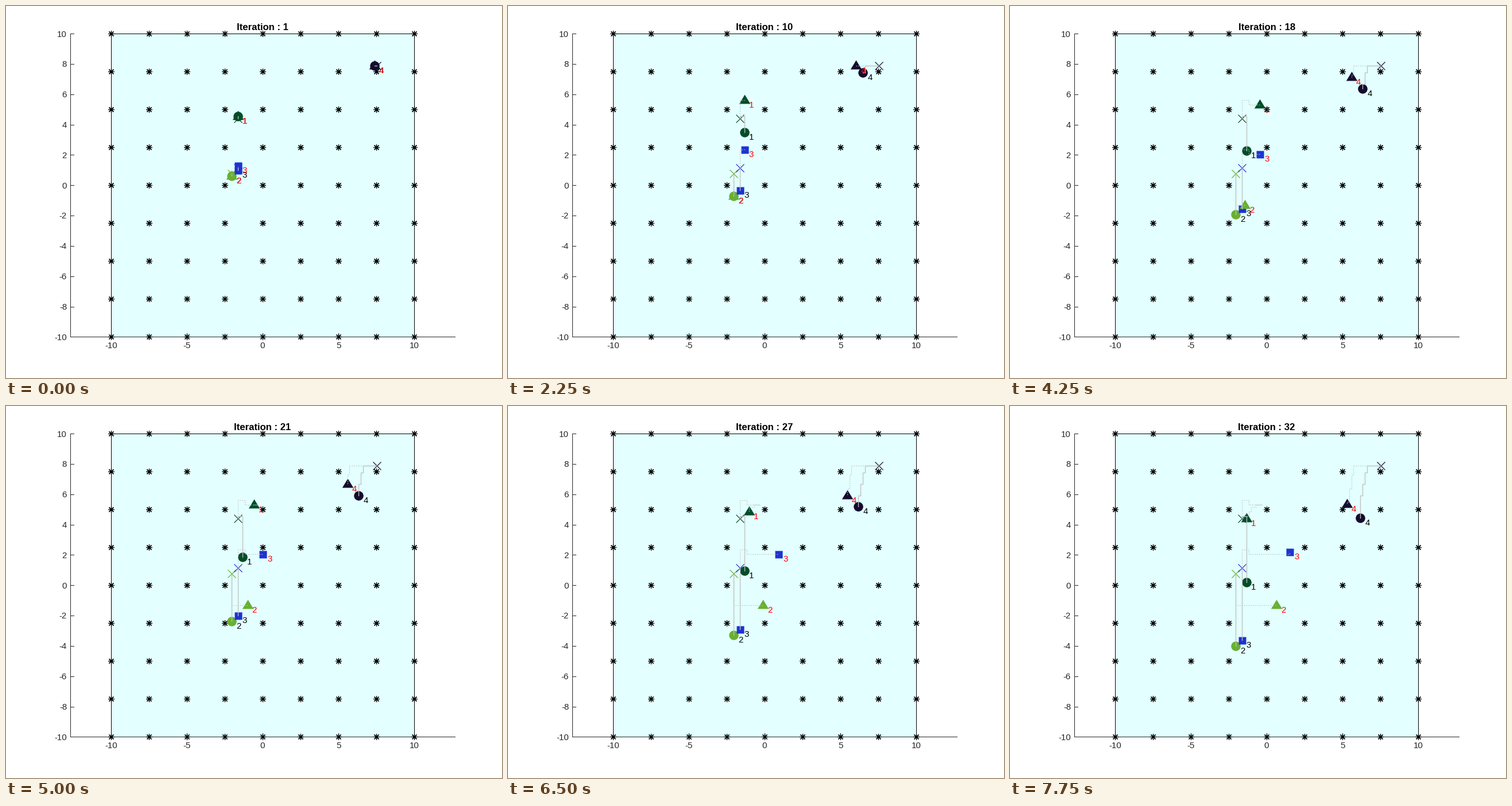
Recreate the animation shown at these times as a matplotlib script. Size 864 by 648 pixels, loop 8 s.

```python
import numpy as np
import matplotlib.pyplot as plt
from matplotlib.animation import FuncAnimation
from matplotlib.path import Path
from matplotlib.patches import Rectangle

W, H, DPI = 864, 648, 72
CX, CY, UNIT = 447.12, 312.3, 26.405    # plot centre and pixels per data unit
STEP = 0.15 * UNIT
ITERATIONS = 32
INK = "#262626"

plt.rcParams["font.family"] = "Liberation Sans"
plt.rcParams["font.size"] = 15

TRIANGLE = Path([(-.97, -.6), (.97, -.6), (0, 1), (-.97, -.6)], closed=True)
SHAPES = {"circle": ("o", 16.5), "square": ("s", 13), "triangle": (TRIANGLE, 20)}
MOVES = {"U": (0, -1), "D": (0, 1), "L": (-1, 0), "R": (1, 0)}

# colour, start pixel, solid route, dotted route, solid shape, dotted shape
AGENTS = [
    ("#004d28", (403.8, 196.1), "U1 R2 D29",
     "U8 R3 D2 R6 L3 D1 L2 D2 L1 D2 L1 D1", "circle", "triangle"),
    ("#69af32", (393.0, 291.6), "D32", "D14 R18", "circle", "triangle"),
    ("#1e32d2", (403.8, 281.6), "D32", "U8 R3 D2 R18 U1", "square", "square"),
    ("#140c2d", (646.0, 104.1), "L6 D3 L1 D5 L1 D5 L1 D10",
     "L12 D4 L1 D6 L1 D6 L1 D1", "circle", "triangle"),
]


def route(start, moves):
    """Pixel position after every iteration, beginning with the start."""
    steps = [MOVES[m[0]] for m in moves.split() for _ in range(int(m[1:]))]
    return np.array(start) + STEP * np.vstack([(0, 0), np.cumsum(steps, axis=0)])


fig = plt.figure(figsize=(W / DPI, H / DPI), dpi=DPI, facecolor="white")
ax = fig.add_axes([0, 0, 1, 1])
ax.set_xlim(0, W)
ax.set_ylim(H, 0)
ax.axis("off")


def px(u):
    return CX + UNIT * u


def py(v):
    return CY - UNIT * v


def draw_stage():
    left, right, top, bottom = 112.4, 782.2, py(10), py(-10)
    ax.add_patch(Rectangle((px(-10), top), 20 * UNIT, 20 * UNIT,
                           fc="#e3ffff", ec="black", lw=1, zorder=1))
    ax.plot([left, left, right], [top, bottom, bottom], color=INK, lw=1, zorder=2)
    for v in range(-10, 11, 2):
        ax.plot([left, left + 6], [py(v)] * 2, color=INK, lw=1, zorder=2)
        ax.text(106, py(v) + 5.3, str(v), ha="right", va="baseline", color=INK)
    for u in range(-10, 11, 5):
        ax.plot([px(u)] * 2, [bottom, bottom - 6], color=INK, lw=1, zorder=2)
        ax.text(px(u), 596, str(u), ha="center", va="baseline", color=INK)
    grid = np.linspace(-10, 10, 9)
    gx, gy = np.meshgrid(px(grid), py(grid))
    ax.plot(gx.ravel(), gy.ravel(), ls="", marker=(8, 2, 0), ms=11,
            mec="black", mew=1.2, zorder=3)


class Walker:
    """A marker with its trail and number."""

    def __init__(self, name, color, points, shape, dotted):
        marker, size = SHAPES[shape]
        self.points = points
        self.dot, = ax.plot([], [], ls="", marker=marker, ms=size,
                            mfc=color, mec="none", zorder=5 + dotted)
        self.trail, = ax.plot([], [], color="#bdbdbd" if dotted else "#c0c0c0",
                              lw=1.1 if dotted else 1.3, zorder=7,
                              ls=(0, (1.5, 2)) if dotted else "-")
        self.label = ax.text(0, 0, name, va="baseline", zorder=8 + dotted,
                             color="red" if dotted else "black")

    def show(self, n):
        x, y = self.points[n]
        self.dot.set_data([x], [y])
        self.trail.set_data(*self.points[:n + 1].T)
        self.label.set_position((x + 8, y + 13))


draw_stage()
title = ax.text(CX, 41.5, "", ha="center", va="baseline", weight="bold",
                size=16.7, color="black")
walkers = []
for i, (color, start, solid, dotted, shape_a, shape_b) in enumerate(AGENTS, 1):
    ax.plot(*start, ls="", marker="x", ms=13.5, mec=color, mew=1.2, zorder=4)
    walkers.append(Walker(str(i), color, route(start, solid), shape_a, False))
    walkers.append(Walker(str(i), color, route(start, dotted), shape_b, True))


def update(frame):
    n = frame + 1
    title.set_text(f"Iteration : {n}")
    for walker in walkers:
        walker.show(n)
    return []


anim = FuncAnimation(fig, update, frames=ITERATIONS, interval=250,
                     init_func=lambda: update(0), repeat=True, repeat_delay=0)
plt.show()
```
